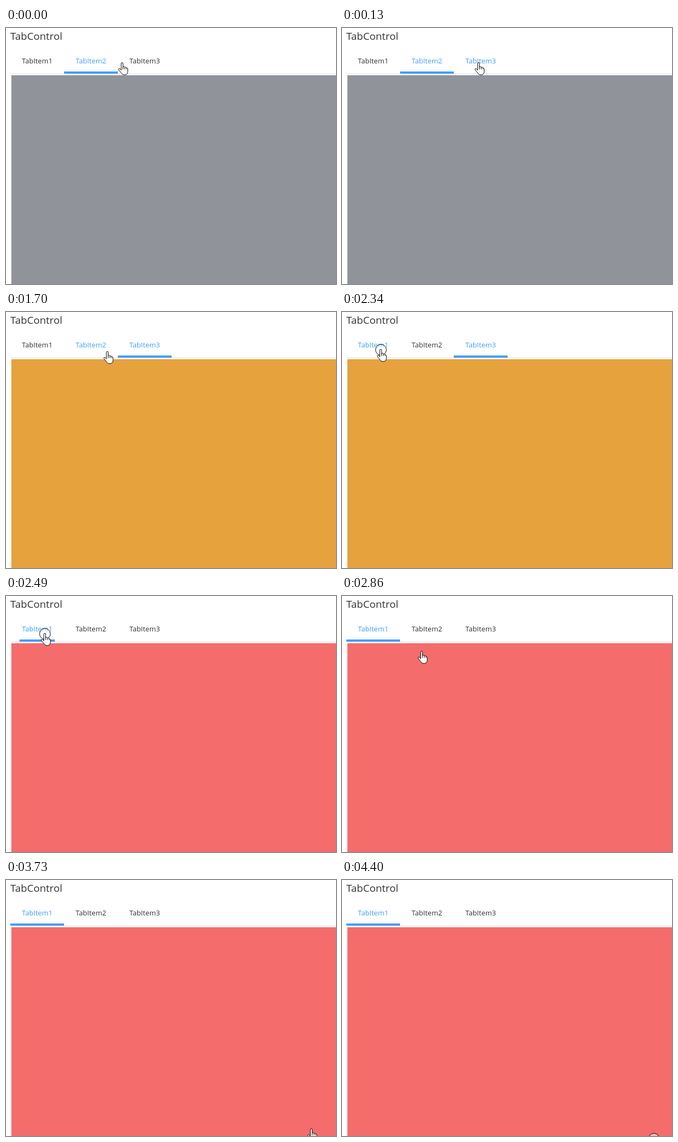
Animation, 614 px wide and 477 px high, one loop 4.5 s. Source, as an HTML page:

```html
<!DOCTYPE html>
<html lang="en">
<head>
<meta charset="utf-8">
<title>TabControl</title>
<style>
  html, body { margin: 0; width: 100%; height: 100%; overflow: hidden; background: #fff; }
  svg { display: block; }
  text { font-family: "Open Sans", "Noto Sans", sans-serif; fill: #303133; }
  .title { font-size: 19px; }
  .tab { font-size: 13.1px; text-anchor: middle; }
  .tab.on { fill: #409eff; }
</style>
</head>
<body>
<svg width="614" height="477" viewBox="0 0 614 477">
  <text class="title" x="8" y="22">TabControl</text>
  <rect x="8" y="85" width="606" height="1" fill="#dcdfe6"/>
  <text class="tab" x="58" y="66">TabItem1</text>
  <text class="tab" x="158" y="66">TabItem2</text>
  <text class="tab" x="258" y="66">TabItem3</text>
  <rect id="bar" y="81" height="4" fill="#409eff"/>
  <rect id="panel" x="10" y="88" width="604" height="389"/>
  <g id="pointer" stroke="#000">
    <circle id="ring" cx=".5" cy="1.5" r="10" fill="#fff" fill-opacity=".5"/>
    <path fill="#fff" stroke-linejoin="round" d="M-1.7 14.5V2.2a1.7 1.7 0 0 1 3.4 0V9
      q0-1.4 1.7-1.2 1.7.2 1.7 1.8 0-.8 1.6-.6 1.7.2 1.7 1.8.2-.6 1.2-.2 1 .5 1 2V16.5
      Q10.6 23.3 4.5 23.3 .5 23.3-1 20.5L-5.7 14.5q-1.6-2 0-3 1.5-.7 4 3z"/>
    <path fill="none" d="M1.7 9v4M5.1 9.6v3.4M8.4 10.8v2.2"/>
  </g>
</svg>
<script>
const LOOP = 4500, STEP = 120, GROW = 250, HOLD = 270;
const COLORS = ["#f56c6c", "#909399", "#e6a23c"];

// Pointer moves: start, number of steps, fingertip x and y at the end
const moves = [
  [0, 1, 216, 64], [130, 1, 254, 64], [1550, 1, 242, 67],
  [1700, 2, 135, 79], [1940, 2, 72, 69],
  [2860, 3, 300, 169], [3250, 1, 197, 97],
  [3370, 4, 568, 463], [3880, 2, 575, 475], [4150, 1, 580, 480.5]
];
// Selections: time shown, tab, underline growth already elapsed
const selections = [[0, 1, GROW], [910, 2, 41], [2490, 0, 75]];
const clicks = [910, 2340, 4400];

const $ = id => document.getElementById(id);
const bar = $("bar"), panel = $("panel"), pointer = $("pointer"), ring = $("ring");
const tabs = document.querySelectorAll(".tab");

const center = tab => 58 + tab * 100;
const easeOut = u => 1 - (1 - Math.min(u, 1)) ** 3;
const stepsSince = (start, t) => Math.floor((t - start) / STEP);

function pointerAt(t) {
  const i = moves.findLastIndex(m => m[0] <= t);
  const [start, count, x, y] = moves[i];
  const [, , fromX, fromY] = moves[Math.max(i - 1, 0)];
  const p = Math.min((stepsSince(start, t) + 1) / count, 1);
  return [fromX + (x - fromX) * p, fromY + (y - fromY) * p];
}

function draw(t) {
  const [x, y] = pointerAt(t);
  const [shown, selected, lead] = selections.findLast(s => s[0] <= t);
  const width = 100 * easeOut((stepsSince(shown, t) * STEP + lead) / GROW);
  const pressed = clicks.some(c => t >= c && t < c + HOLD);

  tabs.forEach((el, i) => {
    const hovered = y < 85 && Math.abs(x - center(i)) < 40;
    el.classList.toggle("on", i === selected || hovered);
  });
  bar.setAttribute("x", center(selected) - width / 2);
  bar.setAttribute("width", width);
  panel.setAttribute("fill", COLORS[selected]);
  pointer.setAttribute("transform", `translate(${x} ${y})`);
  ring.setAttribute("visibility", pressed ? "visible" : "hidden");
}

const start = performance.now();
function tick() {
  draw((performance.now() - start) % LOOP);
  requestAnimationFrame(tick);
}
draw(0);
requestAnimationFrame(tick);
</script>
</body>
</html>
```
